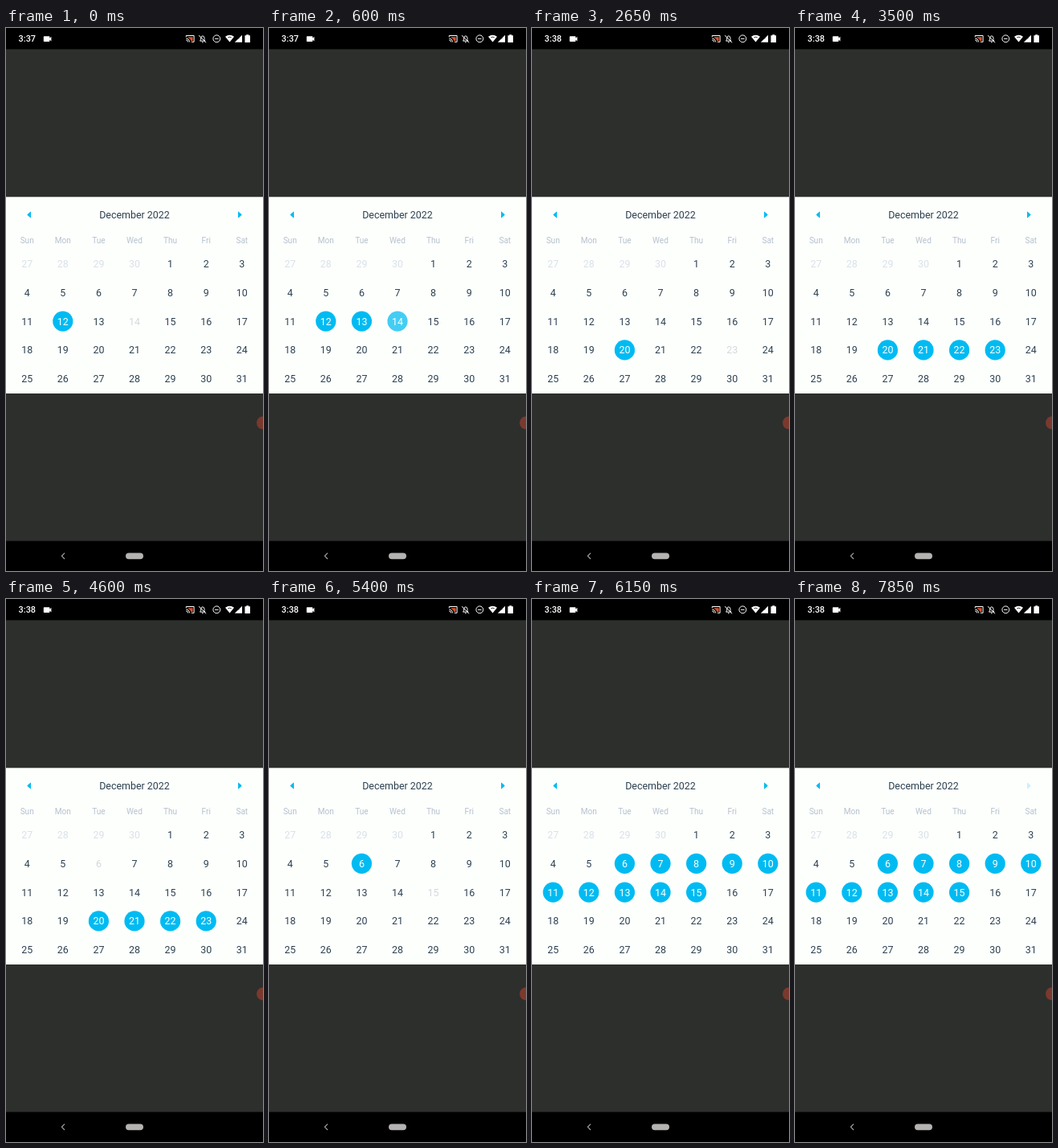
Recreate the animation shown at these times as an HTML page. Size 320x676 px, loop 8 s.

```html
<!DOCTYPE html>
<html lang="en">
<head>
<meta charset="utf-8">
<title>Calendar range picker</title>
<style>
  html, body { margin: 0; width: 100%; height: 100%; overflow: hidden; background: #2d2f2d; }
  svg { display: block; width: 320px; height: 676px; font-family: Roboto, sans-serif; }
  .title, .day { font-size: 12.45px; text-anchor: middle; fill: #2d4150; }
  .week { font-size: 10.1px; text-anchor: middle; fill: #b6c1cd; }
  .other text { fill: #d9e1e8; }
  .day circle { fill: #00bbf2; visibility: hidden; }
  .on circle { visibility: visible; }
  .on text { fill: #fff; }
  .arrow { fill: #00bbf2; }
  .clock { font-size: 10.9px; font-weight: 500; fill: #fff; }
</style>
</head>
<body>
<svg viewBox="0 0 320 676">
  <rect width="320" height="676" fill="#2d2f2d"/>
  <rect width="320" height="26.4" fill="#000"/>
  <rect y="638.6" width="320" height="38" fill="#000"/>

  <text class="clock" id="clock" x="15.6" y="17.4">3:37</text>
  <g fill="#fff">
    <path d="M47.6 10.2h6q.8 0 .8.8v1.7l2-1.9v5.6l-2-1.9v1.7q0 .8-.8.8h-6q-.8 0-.8-.8v-5.2q0-.8.8-.8z"/>
    <path d="M273 10.7q5.500-4 11 0l-5.500 6.800z"/>
    <path d="M294 8.700v9h-9.200z"/>
    <path d="M299.200 8.300h3v1h1.800v8.700h-6.600v-8.700h1.800z"/>
  </g>
  <path d="M276.300 11.900q2.200-1.500 4.400 0M286 12.800h4.500" fill="none" stroke="#000" stroke-width=".8"/>
  <g fill="none" stroke="#fff">
    <path d="M224.300 11.300v-1.800h9.800v7.800h-3.300M224.300 13q4 .4 4.500 4.500M224.300 15q2.200.2 2.500 2.500"/>
    <path d="M241.500 16.100h6.500l-1-1.300v-2.300q0-2.300-2.200-2.700q-2.200.4-2.200 2.700v2.300zM240 9.200l9.200 8.900M244 17.800h1.600"/>
    <circle cx="262.300" cy="13.300" r="4.400"/>
    <path d="M260 13.300h4.600"/>
  </g>
  <path d="M227 11.300h5.600v4.700h-2.200q-.7-2.800-3.400-3.700z" fill="#d9512c"/>

  <circle cx="320" cy="491.500" r="8" fill="#7b392d"/>
  <path d="M73 653.600l-3.600 3.700 3.600 3.700" fill="none" stroke="#aaa" stroke-width="1.100"/>
  <rect x="149" y="653.400" width="22" height="7.800" rx="3.900" fill="#b5b2b2"/>

  <rect y="210.300" width="320" height="244.700" fill="#fdfffd"/>
  <path class="arrow" d="M31 228.400v8q-1-.3-4.700-4q3.700-3.700 4.700-4z"/>
  <path class="arrow" id="next" d="M289 228.400v8q1-.3 4.700-4q-3.700-3.700-4.700-4z"/>
  <text class="title" x="160" y="237.300">December 2022</text>
  <g id="grid"></g>
</svg>
<script>
const LOOP = 8000, FADE = 290, RENDER_LAG = 50, DIM = 0.2;
const grid = document.getElementById('grid');
const clock = document.getElementById('clock');
const next = document.getElementById('next');
const colX = c => 26.2 + 44.6 * c;

// Each tap: the day held, press and release times, and the range it selects.
const taps = [
  { day: 14, down: 0, up: 430, range: [12, 14] },
  { day: 20, down: 1350, up: 1880, range: [20, 20] },
  { day: 23, down: 2650, up: 3180, range: [20, 23] },
  { day: 6, down: 4050, up: 4580, range: [6, 6] },
  { day: 15, down: 5350, up: 5830, range: [6, 15] }
];

function add(parent, tag, attrs, text = '') {
  const el = document.createElementNS('http://www.w3.org/2000/svg', tag);
  for (const key in attrs) el.setAttribute(key, attrs[key]);
  el.textContent = text;
  return parent.appendChild(el);
}

['Sun', 'Mon', 'Tue', 'Wed', 'Thu', 'Fri', 'Sat'].forEach((name, c) =>
  add(grid, 'text', { class: 'week', x: colX(c), y: 267.6 }, name));

const days = [];
for (let i = 0; i < 35; i++) {
  const n = i - 3, x = colX(i % 7), y = 293.5 + 35.8 * Math.floor(i / 7);
  const g = add(grid, 'g', { class: n < 1 ? 'day other' : 'day' });
  add(g, 'circle', { cx: x, cy: y, r: 12.6 });
  add(g, 'text', { x, y: y + 4.4 }, n < 1 ? n + 30 : n);
  if (n > 0) days[n] = g;
}

const easeInOut = p => p < 0.5 ? 2 * p * p : 1 - 2 * (1 - p) ** 2;

function tapOpacity(tap, t) {
  if (t < tap.down) return 1;
  const p = Math.min(1, Math.max(0, (t - tap.up) / FADE));
  return DIM + (1 - DIM) * easeInOut(p);
}

function draw(t) {
  let range = [12, 12];
  for (const tap of taps) {
    if (t >= tap.up + RENDER_LAG) range = tap.range;
    days[tap.day].setAttribute('opacity', tapOpacity(tap, t));
  }
  days.forEach((g, n) => g.classList.toggle('on', n >= range[0] && n <= range[1]));
  clock.textContent = t < 1850 ? '3:37' : '3:38';
  next.setAttribute('opacity', t < 7750 ? 1 : DIM);
}

const start = performance.now();
function tick() {
  draw((performance.now() - start) % LOOP);
  requestAnimationFrame(tick);
}
tick();
</script>
</body>
</html>
```
